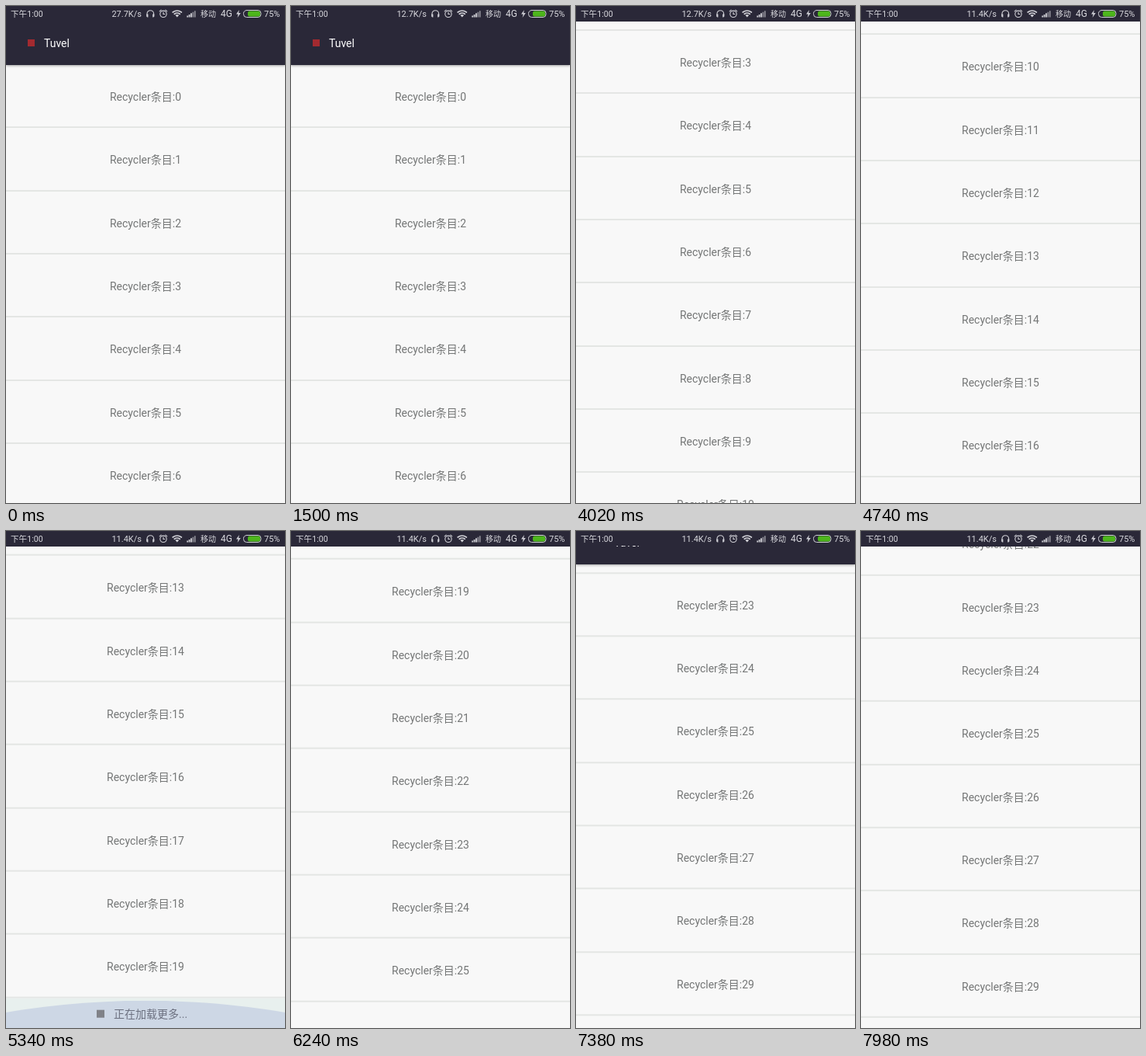
Recreate the animation shown at these times as an HTML page. Size 360 by 640 pixels, loop 8000 ms.

```html
<!DOCTYPE html>
<html lang="zh-CN">
<head>
<meta charset="utf-8">
<title>List</title>
<style>
  html, body { margin: 0; width: 100%; height: 100%; overflow: hidden; background: #f8f8f8; }
  body { font: 14px/20px Roboto, "Noto Sans CJK SC", "Noto Sans CJK", sans-serif; color: #747676; }
  #stage { position: relative; width: 360px; height: 640px; overflow: hidden; }
  #list { position: absolute; top: 76px; left: 0; width: 360px; }
  .row, #footer { position: absolute; left: 0; width: 360px; display: grid; place-items: center; }
  .row { height: 81.333px; box-sizing: border-box; padding-top: 2.4px; border-bottom: 2px solid #e4e6e4; }
  #footer { height: 40px; background: #e8f0ee; }
  #footer span { position: absolute; left: 139px; top: 10px; white-space: nowrap; }
  #footer i { position: absolute; left: 117px; top: 15.5px; width: 10px; height: 10px; background: #8d8c80; }
  #glow { position: absolute; bottom: 0; left: 0; width: 360px; height: 72.3px; overflow: hidden; transform-origin: bottom; }
  #glow::after { content: ""; position: absolute; left: -360px; top: 0; width: 1080px; height: 1080px; border-radius: 50%; background: #3f51b5; }
  #bar { position: absolute; top: 0; left: 0; width: 360px; height: 76px; background: #2a2838; color: #fff; }
  #bar.raised { box-shadow: 0 1px 3px rgba(0, 0, 0, .35); }
  #bar i { position: absolute; left: 28px; top: 43px; width: 9px; height: 9px; background: #a32a30; }
  #bar span { position: absolute; left: 49px; top: 38px; }
  #status { position: absolute; top: 0; left: 0; width: 360px; height: 19px; background: #2a2838; }
  #status svg { display: block; overflow: visible; }
  text { fill: #d9d9de; font-size: 11px; }
  .stroke { fill: none; stroke: #d0d0d6; stroke-width: 1.1; stroke-linecap: round; }
  .solid { fill: #d0d0d6; }
</style>
</head>
<body>
<div id="stage">
  <div id="list"></div>
  <div id="glow"></div>
  <div id="bar"><i></i><span>Tuvel</span></div>
  <div id="status">
    <svg width="360" height="20">
      <text x="6" y="14" style="font-size:10.6px">下午1:00</text>
      <text id="speed" x="175" y="14" text-anchor="end"></text>
      <!-- headphones -->
      <path class="stroke" d="M182 11v-1a4.3 4.3 0 0 1 8.6 0v1"/>
      <path class="solid" d="M181.2 10.5h2.2v4.1h-1l-1.2-1zM189.2 10.5h2.2v3.1l-1.2 1h-1z"/>
      <!-- alarm clock -->
      <circle class="stroke" cx="203" cy="10.3" r="4.2"/>
      <path class="stroke" d="M203 8v2.5h1.8M198.2 6.8l2-1.7M207.8 6.8l-2-1.7"/>
      <!-- wifi -->
      <path class="stroke" style="stroke-width:1.7" d="M215.2 8q5.6-4 11.2 0M217.3 10.3q3.5-2.6 7 0"/>
      <path class="solid" d="M218.4 11.8q2.4-1.5 4.8 0l-2.4 2.7z"/>
      <!-- signal -->
      <path class="solid" d="M233.3 12.5h1.8v2h-1.8zM235.7 11h1.8v3.5h-1.8zM238.1 9.3h1.8v5.2h-1.8z"/>
      <path fill="#8a8993" d="M240.5 7.8h1.8v6.7h-1.8zM242.9 6.2h1.8v8.3h-1.8z"/>
      <text x="251" y="14" style="font-size:10px">移动</text>
      <text x="277" y="14.2" style="font-size:12px">4G</text>
      <!-- charging battery -->
      <path class="solid" d="M301 5l-4 5.6h2.6l-1 4.4 4.2-6h-2.7z"/>
      <rect class="stroke" style="stroke-width:1" x="306.5" y="5.5" width="22.5" height="9" rx="4"/>
      <rect x="312" y="6.4" width="16" height="7.2" rx="2.4" fill="#4db51c"/>
      <text x="333" y="14">75%</text>
    </svg>
  </div>
</div>
<script>
const LOOP = 8000, STEP = 60, ROW = 81.333, BAR = 56;
const FIRST_END = 1101.3, SECOND_END = 1914.7, PULLED = 1833.2;
const PULL_START = 7320, PULL_PEAK = 7600;
const LOADS = [5640, 7200];
const GLOWS = [5120, 6680];

// [time, distance the content has moved up]
const travelKeys = [
  [0, 0], [2880, 0], [2940, 14], [3000, 35], [3080, 72], [3240, 144],
  [3480, 222], [3720, 267], [4020, 288], [4200, 288],
  [4320, 340], [4440, 515], [4620, 740], [4840, 930], [5120, FIRST_END], [5820, FIRST_END],
  [5940, 1160], [6060, 1345], [6240, 1584.3], [6440, 1766], [6680, SECOND_END], [PULL_START, SECOND_END],
  [7380, 1891.7], [7440, 1860], [7560, PULLED], [7640, PULLED], [7980, 1889.2], [LOOP, 1889.2]
];

const $ = id => document.getElementById(id);
const list = $("list"), bar = $("bar"), glow = $("glow"), speed = $("speed");

function addItem(className, index, html) {
  const el = document.createElement("div");
  el.className = className;
  el.style.top = index * ROW + "px";
  el.innerHTML = html;
  list.append(el);
  return el;
}
for (let i = 0; i < 32; i++) addItem("row", i, `<span>Recycler条目:${i}</span>`);
const footer = addItem("", 20, "<i></i><span>正在加载更多...</span>");
footer.id = "footer";

function slope(i) {
  const a = travelKeys[i], b = travelKeys[i + 1];
  return a && b ? (b[1] - a[1]) / (b[0] - a[0]) : 0;
}
function tangent(i) {
  const a = slope(i - 1), b = slope(i);
  if (a * b > 0) return 2 * a * b / (a + b);
  return a * b < 0 ? 0 : a + b;
}
function travel(t) {
  const i = travelKeys.findIndex((key, n) => t < travelKeys[n + 1][0]);
  const [t0, y0] = travelKeys[i], [t1, y1] = travelKeys[i + 1];
  if (y0 === y1) return y0;
  const d = t1 - t0, u = (t - t0) / d, v = 1 - u;
  return v * v * (1 + 2 * u) * y0 + u * u * (1 + 2 * v) * y1
    + d * u * v * (v * tangent(i) - u * tangent(i + 1));
}

// The bar leaves and returns before the list itself scrolls.
function barOffset(t, moved) {
  if (t < PULL_START) return -Math.min(moved, BAR);
  if (t < PULL_PEAK) return Math.min(0, SECOND_END - moved - BAR);
  return Math.max(-BAR, PULLED - moved);
}

function glowAmount(age) {
  if (age < 0 || age > 640) return 0;
  return age < 40 ? age / 40 : (1 - (age - 40) / 600) ** 2;
}

function draw(t) {
  const moved = travel(t), offset = barOffset(t, moved);
  list.style.transform = `translateY(${-moved}px)`;
  bar.style.transform = `translateY(${offset}px)`;
  bar.classList.toggle("raised", offset > 0.1 - BAR);

  const loaded = LOADS.filter(time => t >= time).length;
  footer.style.top = (20 + 10 * loaded) * ROW + "px";
  footer.style.display = loaded < 2 ? "" : "none";

  const amount = Math.max(...GLOWS.map(time => glowAmount(t - time)));
  glow.style.opacity = 0.31 * amount;
  glow.style.transform = `scaleY(${amount})`;

  speed.textContent = (t < 720 ? "27.7" : t < 4740 ? "12.7" : "11.4") + "K/s";
}

const start = performance.now();
function tick() {
  const t = (performance.now() - start) % LOOP;
  draw(Math.floor(t / STEP) * STEP);
  requestAnimationFrame(tick);
}
tick();
</script>
</body>
</html>
```
